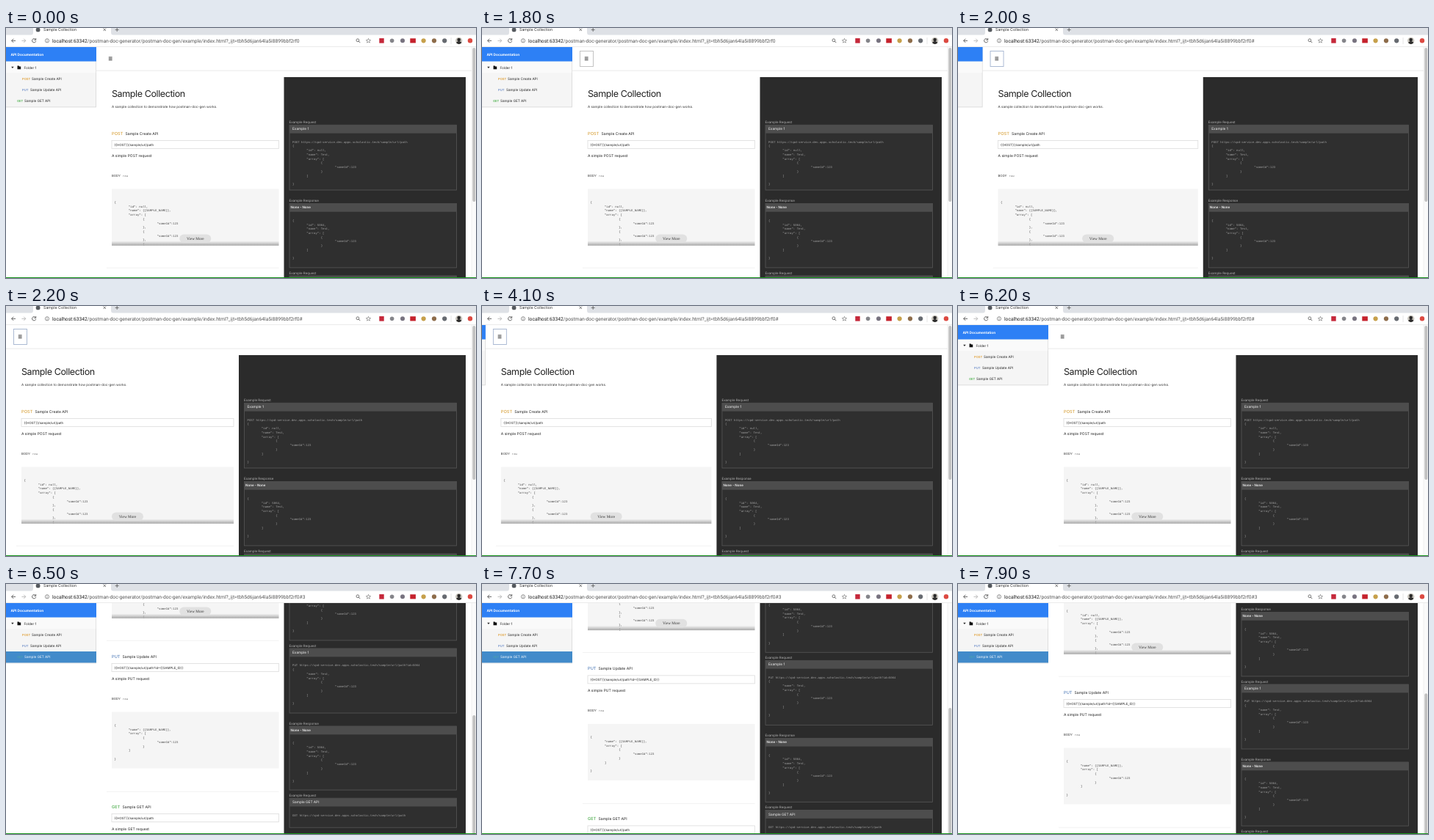
These frames come from a looping animation (640 px wide and 341 px high, 8 s). An HTML page:

```html
<!DOCTYPE html>
<html lang="en">
<head>
<meta charset="utf-8">
<title>Sample Collection</title>
<style>
  html, body { margin: 0; width: 100%; height: 100%; overflow: hidden; background: #fff; }
  svg { display: block; width: 640px; height: 341px; }
  text { font-family: Inter, "Open Sans", sans-serif; white-space: pre; text-rendering: geometricPrecision; }
  .mono { font-family: "Liberation Mono", "DejaVu Sans Mono", monospace; }
  .serif { font-family: "Liberation Serif", serif; }
  .url { font-family: Roboto, sans-serif; }
</style>
</head>
<body>
<svg id="stage" viewBox="0 0 640 341" xmlns="http://www.w3.org/2000/svg">
  <defs>
    <linearGradient id="fade" x1="0" y1="0" x2="0" y2="1">
      <stop offset="0" stop-color="#aaa" stop-opacity="0"/>
      <stop offset="1" stop-color="#a8a8a8"/>
    </linearGradient>
  </defs>
</svg>
<script>
const LOOP = 8000, STEP = 100, SIDE = 123;
const stage = document.getElementById('stage');

function add(parent, tag, attrs = {}) {
  const el = document.createElementNS('http://www.w3.org/2000/svg', tag);
  for (const key in attrs) el.setAttribute(key, attrs[key]);
  parent.appendChild(el);
  return el;
}
const group = parent => add(parent, 'g');
const rect = (p, x, y, width, height, fill, more) => add(p, 'rect', { x, y, width, height, fill, ...more });
const path = (p, d, stroke, width = 1, fill = 'none') =>
  add(p, 'path', { d, stroke, 'stroke-width': width, fill });
const dot = (p, cx, cy, r, fill, more) => add(p, 'circle', { cx, cy, r, fill, ...more });

// y is the middle of the capitals
function text(p, x, y, str, size, fill = '#333', more = {}) {
  const el = add(p, 'text', { x, y: y + size * 0.35, 'font-size': size, fill, ...more });
  el.textContent = str;
  return el;
}

// Boxes that narrow by half of what the sidebar takes
const fluid = [];
function wide(p, x, y, width, height, fill, more) {
  const el = rect(p, x, y, width, height, fill, more);
  fluid.push({ el, width });
  return el;
}

const LINE = 5.73, TAB = 19.36;
function code(p, x, y, lines, fill) {
  lines.forEach((line, i) => {
    const str = line.trimStart();
    if (str) text(p, x + (line.length - str.length) * TAB, y + i * LINE, str, 4.033, fill, { class: 'mono' });
  });
}
const ITEM = ['\t\t{', '\t\t\t"someId":123'];
const json = (...fields) =>
  ['{', ...fields.map(f => '\t' + f + ','), '\t"array": [', ...ITEM, '\t\t}', '\t]', '', '}'];

const page = group(stage);
const left = group(page);
const right = group(page);

// Top bar
const navLine = rect(left, 0, 57.7, 634, 0.8, '#e3e3e3');
const focus = rect(left, 10.5, 31.5, 18, 21, '#fff', { 'stroke-width': 0.9 });
for (const y of [39.9, 41.8, 43.7]) rect(left, 16.8, y - 0.45, 4.8, 0.9, '#333');

// Left column
text(left, 21, 89.3, 'Sample Collection', 12.5, '#222', { 'letter-spacing': -0.4 });
text(left, 21, 107.4, 'A sample collection to demonstrate how postman-doc-gen works.', 4.6);

function section(y, verb, color, name, nameX, url) {
  text(left, 21, y, verb, 5.7, color, { 'font-weight': 500 });
  text(left, nameX, y, name, 5.1, '#222');
  wide(left, 21, y + 9.5, 289, 11, '#fff', { stroke: '#dcdcdc', 'stroke-width': 0.8 });
  text(left, 24.5, y + 15.2, url, 4.37, '#222');
  text(left, 21, y + 29.8, `A simple ${verb} request`, 5, '#222');
}
function bodyBlock(y, lines) {
  text(left, 21, y - 18, 'BODY', 4.3);
  text(left, 36, y - 18, 'raw', 3.9, '#777', { class: 'mono' });
  wide(left, 21, y, 289, 77, '#f5f5f5');
  code(left, 24.5, y + 18, lines, '#444');
}

section(144, 'POST', '#d9a441', 'Sample Create API', 39.5, '{{HOST}}/sample/url/path');
bodyBlock(219.5, ['{', '\t"id": null,', '\t"name": {{SAMPLE_NAME}},', '\t"array": [',
  ...ITEM, '\t\t},', ...ITEM, '\t\t},', '\t\t{']);
wide(left, 21, 290.5, 289, 6.3, 'url(#fade)');
const more = group(left);
rect(more, -21.5, 281.5, 43, 11.5, '#e1e1e1', { rx: 5.7 });
text(more, 0, 287.2, 'View More', 5.25, '#333', { class: 'serif', 'text-anchor': 'middle' });
wide(left, 14, 326.8, 296, 0.7, '#ececec');

section(349, 'PUT', '#5b84bd', 'Sample Update API', 35.5, '{{HOST}}/sample/url/path?id={{SAMPLE_ID}}');
bodyBlock(424.5, json('"name": {{SAMPLE_NAME}}'));
wide(left, 14, 532.8, 296, 0.7, '#ececec');

section(554, 'GET', '#4fae4f', 'Sample GET API', 35.5, '{{HOST}}/sample/url/path');

// Right column
wide(right, 0, 67, 309, 600, '#2b2b2b');
function example(y, label, title, height, lines) {
  const plain = title !== 'None - None';
  text(right, 7, y, label, 4.5, '#b4b4b4');
  wide(right, 7.5, y + 4, 289, height, '#2f2f2f', { stroke: '#575757', 'stroke-width': 0.8 });
  wide(right, 7.5, y + 4, 289, 11.3, '#4d4d4d');
  text(right, plain ? 11.5 : 9, y + 9.4, title, plain ? 4.75 : 4.5, '#f4f4f4', { 'font-weight': plain ? 400 : 600 });
  code(right, 11.5, y + 27, lines, '#a5a5a5');
}
const API = 'https://cpd-service.dev.apps.scholastic.tech/sample/url/path';
const REQ = 'Example Request', RES = 'Example Response', NONE = 'None - None';
const reply = json('"id": 5064', '"name": Test');
example(128.3, REQ, 'Example 1', 88.7, ['POST ' + API, ...json('"id": null', '"name": Test')]);
example(235.4, RES, NONE, 87.5, reply);
example(334, REQ, 'Example 1', 88, ['PUT ' + API + '?id=5064', ...json('"name": Test')]);
example(440, RES, NONE, 87, reply);
example(538.2, REQ, 'Sample GET API', 40, ['GET ' + API]);

// Sidebar
const side = group(stage);
rect(side, 0, 26, SIDE, 82.3, '#d9d9d9');
rect(side, 0, 26, SIDE - 0.8, 81.4, '#f5f5f5');
rect(side, 0, 45.5, SIDE - 0.8, 15.5, '#fafafa');
rect(side, 0, 26, SIDE, 19.5, '#2d80f5');
text(side, 6.5, 36, 'API Documentation', 4.75, '#fff', { 'font-weight': 700 });
path(side, 'M7.2 52.8h3.4l-1.7 2.1z', 'none', 0, '#222');
path(side, 'M15.5 51.6h2l.7.8h2v3.9h-4.7z', 'none', 0, '#111');
text(side, 24.5, 54, 'Folder 1', 4.63, '#222');
const active = rect(side, 0, 92, SIDE, 15.4, '#428bca');
function entry(x, y, verb, color, nameX, name) {
  const tag = text(side, x, y, verb, 4.15, color, { 'font-weight': 600 });
  return { tag, label: text(side, nameX, y, name, 4.63, '#222') };
}
entry(22, 69.3, 'POST', '#e0a13a', 35, 'Sample Create API');
entry(22, 84.5, 'PUT', '#6f8fc9', 33, 'Sample Update API');
const getItem = entry(15, 99.6, 'GET', '#55b555', 25, 'Sample GET API');

// Scrollbar
rect(stage, 634, 26, 6, 315, '#fafafa');
rect(stage, 633.7, 26, 0.6, 315, '#e6e6e6');
const thumb = rect(stage, 635.3, 27, 4, 210, '#c1c1c1', { rx: 2 });

// Browser frame
const bar = group(stage);
rect(bar, 0, 0, 640, 10, '#dee1e6');
rect(bar, 0, 9.5, 640, 16.5, '#fff');
path(bar, 'M33 10q4 0 4-4V0h106v6q0 4 4 4z', 'none', 0, '#fff');
dot(bar, 43.6, 2.4, 2.9, '#55595e');
text(bar, 51, 2.6, 'Sample Collection', 5.3, '#333');
path(bar, 'M132.6 .6l3.4 3.4m0-3.4l-3.4 3.4M148.7 2.4h5M151.2 0v4.9', '#555', 0.8);
path(bar, 'M13 17.3H7.6m2.6-2.6l-2.6 2.6 2.6 2.6', '#555', 0.9);
path(bar, 'M21.4 17.3h5.4m-2.6-2.6l2.6 2.6-2.6 2.6', '#b5b5b5', 0.9);
path(bar, 'M40 15.4a2.6 2.6 0 1 0 .7 2.4M40.7 14v2.3h-2.3', '#555', 0.9);
dot(bar, 56, 17.3, 2.6, 'none', { stroke: '#666', 'stroke-width': 0.7 });
path(bar, 'M56 16.9v1.8M56 15.6v.7', '#666', 0.7);

const url = text(bar, 63, 17.3, '', 6.68, '#555', { class: 'url' });
add(url, 'tspan', { fill: '#1d1d1d' }).textContent = 'localhost:63342';
const rest = add(url, 'tspan');
const PATH = '/postman-doc-generator/postman-doc-gen/example/index.html?_ijt=tbh5d6jan64la5i8899bbf2rf0';

dot(bar, 478.9, 16.7, 1.9, 'none', { stroke: '#555', 'stroke-width': 0.8 });
path(bar, 'M480.3 18.1l2 2', '#555', 0.9);
path(bar, 'M493.5 14.3l.9 2 2.2.2-1.7 1.4.5 2.2-1.9-1.2-1.9 1.2.5-2.2-1.7-1.4 2.2-.2z', '#666', 0.6);
rect(bar, 508.3, 14, 6.4, 6.6, '#c5283a');
dot(bar, 525.6, 17.3, 2.8, '#85858a');
dot(bar, 540, 17.3, 3, '#77727f');
rect(bar, 550.3, 14.2, 7.6, 6.2, '#c5222c');
dot(bar, 568.6, 17.3, 3.1, '#c6a04b');
dot(bar, 583, 17.3, 3.1, '#8d6c4a');
dot(bar, 597.2, 17.3, 3.1, '#666a70');
rect(bar, 605.7, 13, 0.7, 9, '#dadada');
dot(bar, 616.7, 17.3, 4.6, '#c9c5bd');
dot(bar, 616.7, 16, 2.3, '#2b2a2a');
path(bar, 'M612.9 19.9q3.8-4 7.6 0-3.8 4-7.6 0z', 'none', 0, '#2b2a2a');
dot(bar, 632, 17.3, 3.2, '#dc4a42');
rect(bar, 0, 25.4, 640, 0.6, '#dcdcdc');
rect(stage, 0, 340, 640, 1, '#16921b');

// cubic-bezier(.25, .1, .25, 1)
function ease(p) {
  if (p <= 0) return 0;
  if (p >= 1) return 1;
  let lo = 0, hi = 1, s = 0.5;
  for (let i = 0; i < 24; i++) {
    s = (lo + hi) / 2;
    const x = 0.75 * s * (1 - s) ** 2 + 0.75 * s * s * (1 - s) + s ** 3;
    if (x < p) lo = s; else hi = s;
  }
  return 0.3 * s * (1 - s) ** 2 + 3 * s * s * (1 - s) + s ** 3;
}

const HIDE = 1870, SHOW = 4083, SLIDE = 300, PICK = 6500, BACK = 7600, BOTTOM = 250;

function draw(t) {
  const open = 1 - ease((t - HIDE) / SLIDE) + ease((t - SHOW) / SLIDE);
  const off = SIDE * open;
  const picked = t >= PICK;
  const scroll = picked ? BOTTOM - Math.max(0, t - BACK) * 0.1633 : 0;

  page.setAttribute('transform', `translate(0 ${-scroll})`);
  left.setAttribute('transform', `translate(${off} 0)`);
  right.setAttribute('transform', `translate(${317 + off / 2} 0)`);
  side.setAttribute('transform', `translate(${off - SIDE} 0)`);
  side.style.display = off > 0.5 ? '' : 'none';
  for (const f of fluid) f.el.setAttribute('width', f.width - off / 2);
  navLine.setAttribute('width', 634 - off);
  more.setAttribute('transform', `translate(${165.5 - off / 4} 0)`);
  thumb.setAttribute('y', 27 + scroll * 0.608);

  focus.style.display = t >= 1700 && t < 5000 ? '' : 'none';
  focus.setAttribute('stroke', t < HIDE ? '#bdbdbd' : '#a3b3cf');
  active.style.display = picked ? '' : 'none';
  getItem.label.setAttribute('fill', picked ? '#fff' : '#222');
  getItem.tag.setAttribute('fill', picked ? '#4a9fb0' : '#55b555');
  rest.textContent = PATH + (picked ? '#3' : t >= HIDE ? '#' : '');
}

const start = performance.now();
function tick() {
  const t = (performance.now() - start) % LOOP;
  draw(Math.floor(t / STEP) * STEP);
  requestAnimationFrame(tick);
}
tick();
</script>
</body>
</html>
```
